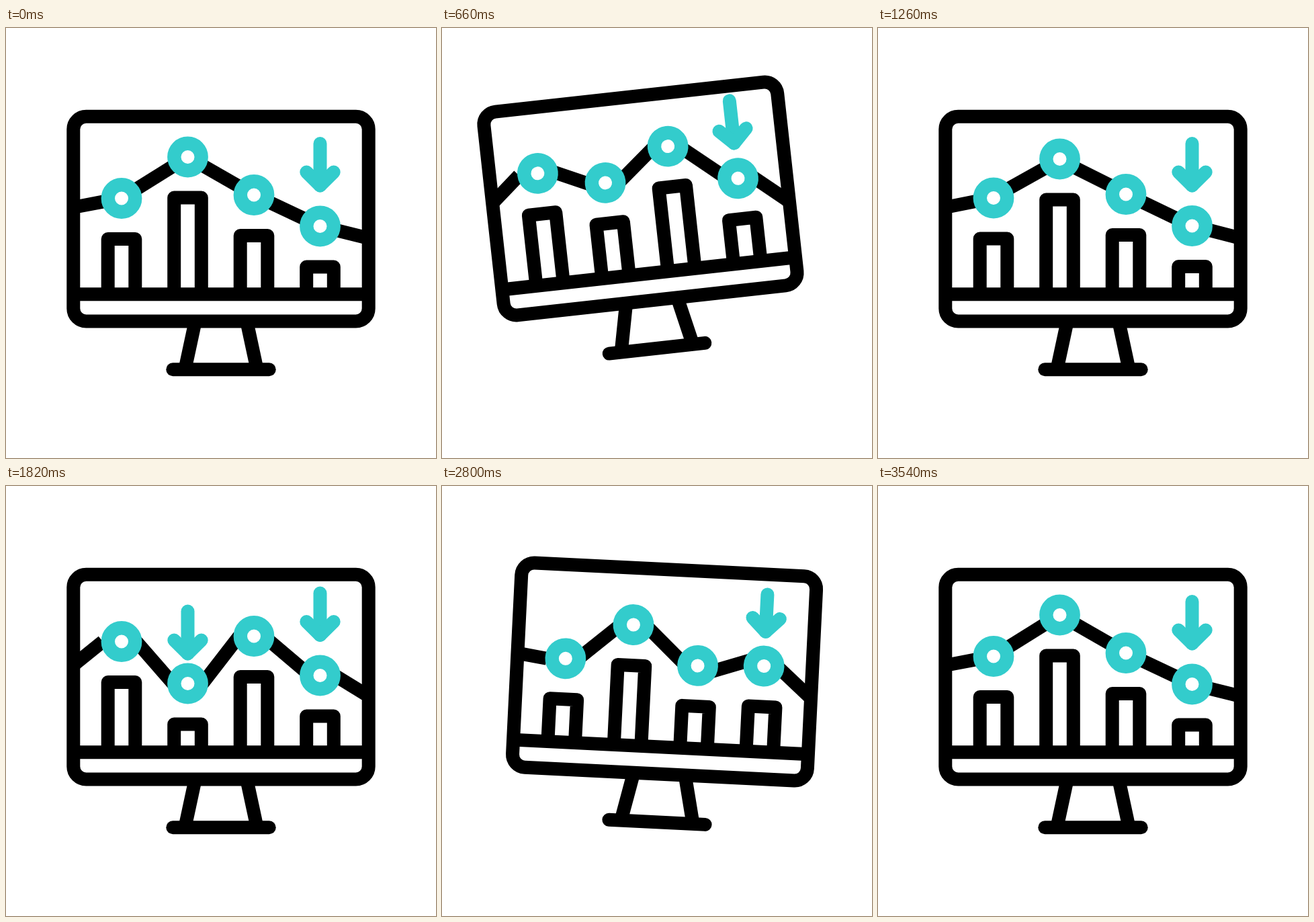
These frames come from a looping animation (640x640 px, 3600 ms). An HTML page with a canvas:

```html
<!DOCTYPE html>
<html lang="en">
<head>
<meta charset="utf-8">
<title>Falling chart</title>
<style>
  html, body { margin: 0; width: 100%; height: 100%; overflow: hidden; background: #fff; }
  canvas { display: block; width: 640px; height: 640px; }
</style>
</head>
<body>
<canvas id="stage" width="640" height="640"></canvas>
<script>
const ctx = document.getElementById('stage').getContext('2d');
const LOOP = 3600, STEP = 20;
const INK = '#000', TEAL = '#33cccc';
const PIVOT = [320, 508];
const COLUMNS = [172, 270.5, 369, 467.5];
const HOME = [253.5, 192, 248.5, 295];
const LEFT_END = [100, 267], RIGHT_END = [540, 313];

// time, four node heights, arrow tip, arrow top, how closely links keep their resting slope
const POSES = [
  [220, ...HOME, 244.5, 162, 1],
  [700, 229.5, 256, 210.5, 269.5, 227, 143.5, 0],
  [1260, 253, 195, 247.5, 294.5, 244.5, 162, 1],
  [1820, 231.5, 294, 223.5, 282, 232, 149.5, 0],
  [2440, 278, 225, 281, 259, 221, 148, 0],
  [3500, ...HOME, 244.5, 162, 1]
];

// time, tilt in degrees, lift in pixels
const HOPS = [
  [220, 0, 0], [555, -7, 35], [1065, 0, 0],
  [2620, 0, 0], [3005, 6.3, 17.5], [3300, 0, 0]
];

const mix = (a, b, k) => a + (b - a) * k;
const mixPoint = (a, b, k) => [mix(a[0], b[0], k), mix(a[1], b[1], k)];

function ease(t, from, to) {
  const u = Math.min(1, Math.max(0, (t - from) / (to - from)));
  return (1 - Math.cos(Math.PI * u)) / 2;
}

function sample(keys, t) {
  if (t <= keys[0][0]) return keys[0].slice(1);
  const next = keys.findIndex(key => key[0] > t);
  if (next < 0) return keys[keys.length - 1].slice(1);
  const a = keys[next - 1], b = keys[next];
  const k = ease(t, a[0], b[0]);
  return a.slice(1).map((value, i) => mix(value, b[i + 1], k));
}

function stroke(points, color, cap = 'butt', width = 20) {
  ctx.strokeStyle = color;
  ctx.lineWidth = width;
  ctx.lineCap = cap;
  ctx.lineJoin = 'round';
  ctx.beginPath();
  points.forEach(p => ctx.lineTo(...p));
  ctx.stroke();
}

function drawMonitor() {
  ctx.strokeStyle = INK;
  ctx.lineWidth = 20;
  ctx.beginPath();
  ctx.roundRect(100.3, 131.8, 439.4, 304.6, 19);
  ctx.stroke();
  stroke([[100, 396.2], [540, 396.2]], INK);
  stroke([[281, 440], [266.8, 506]], INK);
  stroke([[359, 440], [373.2, 506]], INK);
  stroke([[248.3, 508.2], [391.7, 508.2]], INK, 'round');
}

function drawBar(x, nodeY) {
  const top = nodeY + 60.5;
  stroke([[x - 20.3, 396], [x - 20.3, top], [x + 20.3, top], [x + 20.3, 396]], INK);
}

function drawLinks(heights, hold) {
  const reach = 22;
  for (let i = 0; i < 3; i++) {
    const gap = COLUMNS[i + 1] - COLUMNS[i];
    const keep = i === 2 ? mix(0.6, 1, hold) : hold;
    const rise = keep * reach * (HOME[i + 1] - HOME[i]) / gap;
    stroke([
      [COLUMNS[i] + reach, heights[i] + rise],
      [COLUMNS[i + 1] - reach, heights[i + 1] - rise]
    ], INK);
  }
  stroke([LEFT_END, [COLUMNS[0] - 28, heights[0] + 5.2 * hold]], INK);
  stroke([[COLUMNS[3] + reach, heights[3] + 5.5 * hold], RIGHT_END], INK);
}

function drawNode(x, y) {
  ctx.beginPath();
  ctx.arc(x, y, 20.2, 0, Math.PI * 2);
  ctx.fillStyle = '#fff';
  ctx.fill();
  ctx.strokeStyle = TEAL;
  ctx.lineWidth = 20.4;
  ctx.stroke();
}

function drawArrow(x, top, tip, scale = 1) {
  if (scale <= 0) return;
  const middle = (top + tip) / 2, point = tip - 10;
  ctx.save();
  ctx.translate(x, middle);
  ctx.scale(scale, scale);
  ctx.translate(-x, -middle);
  stroke([[x, top + 10], [x, point]], TEAL, 'round');
  stroke([[x - 20.2, point - 20], [x, point], [x + 20.2, point - 20]], TEAL, 'round');
  ctx.restore();
}

function drawSparks(t) {
  if (t < 3090 || t > 3510) return;
  const head = ease(t, 3080, 3320), tail = ease(t, 3260, 3510);
  const sparks = [[[77.5, 131.5], [51.5, 119]], [[105, 110.5], [97, 80.5]]];
  for (const [from, to] of sparks) {
    stroke([mixPoint(from, to, tail), mixPoint(from, to, head)], TEAL, 'round', 21);
  }
}

function draw(t) {
  const [tilt, lift] = sample(HOPS, t);
  const [a, b, c, d, tip, top, hold] = sample(POSES, t);
  const heights = [a, b, c, d];

  ctx.fillStyle = '#fff';
  ctx.fillRect(0, 0, 640, 640);
  ctx.save();
  ctx.translate(PIVOT[0], PIVOT[1] - lift);
  ctx.rotate(tilt * Math.PI / 180);
  ctx.translate(-PIVOT[0], -PIVOT[1]);

  COLUMNS.forEach((x, i) => drawBar(x, heights[i]));
  drawLinks(heights, hold);
  drawMonitor();
  COLUMNS.forEach((x, i) => drawNode(x, heights[i]));
  drawArrow(COLUMNS[3], top, tip);
  drawArrow(COLUMNS[1], 176.5, 259.5, ease(t, 1620, 1760) - ease(t, 1900, 2040));
  drawSparks(t);
  ctx.restore();
}

const start = performance.now();
function tick() {
  const t = (performance.now() - start) % LOOP;
  draw(Math.floor(t / STEP) * STEP);
  requestAnimationFrame(tick);
}
tick();
</script>
</body>
</html>
```
